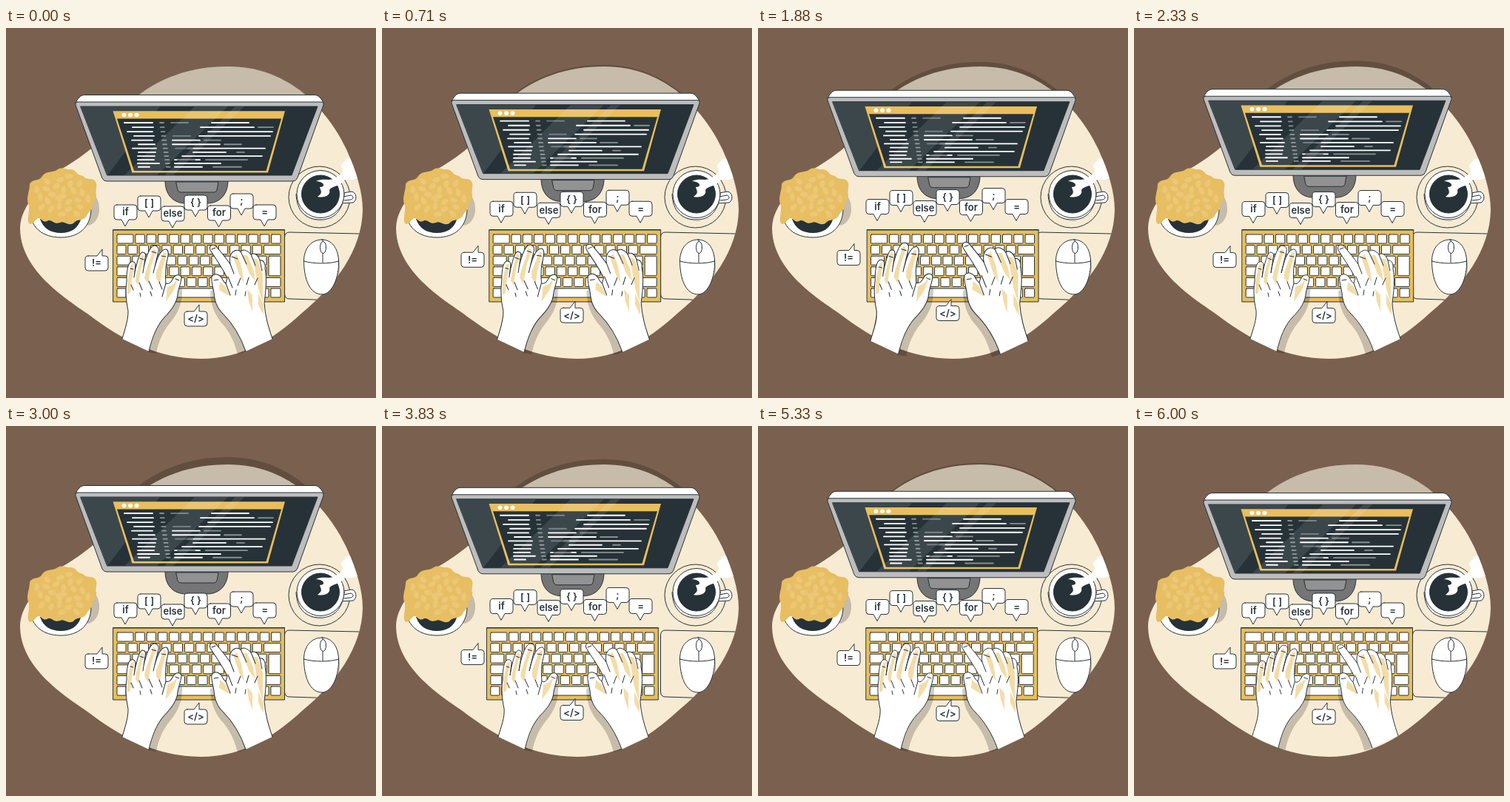
Animation of 500 by 500 pixels, one loop 6.04 s. Source, as an HTML page:

```html
<!DOCTYPE html>
<html lang="en">
<head>
<meta charset="utf-8">
<title>Typing code</title>
<style>
html, body { margin: 0; width: 100%; height: 100%; overflow: hidden; background: #7a614f; }
svg { display: block; width: 100vw; height: 100vh; }
.ink { stroke: #263238; stroke-width: 1; stroke-linejoin: round; stroke-linecap: round; }
.line { fill: none; }
.white { fill: #fff; }
.gold { fill: #e9be5c; }
.dark { fill: #263238; }
.cream { fill: #f7ebd3; }
.shade { fill: #000; opacity: .2; }
.skin { fill: #f3dca6; }
text { font: 600 13px Inter, "Open Sans", sans-serif; fill: #263238; text-anchor: middle; }
</style>
</head>
<body>
<svg viewBox="0 0 500 500">
  <defs>
    <path id="blob" d="M300 52C342 52 372 66 397 84C425 106 447 136 460 164C474 195 482 222 482 246C481 300 445 348 400 385C362 420 320 447 263 447C205 446 160 424 110 386C75 362 19 325 19 270C20 240 48 212 76 190C108 171 140 148 168 100C205 67 250 52 300 52Z"/>
    <clipPath id="inBlob"><use href="#blob"/></clipPath>
    <clipPath id="aboveDesk"><path d="M165 40H424V105H140V100Z"/></clipPath>
    <clipPath id="inScreen"><path d="M101 106H421L386 199H137Z"/></clipPath>
  </defs>

  <use href="#blob" class="cream"/>

  <!-- plant -->
  <path class="shade" d="M100 204C118 200 126 212 120 226C130 238 128 262 112 267L96 262Z"/>
  <path class="white ink" d="M33 250C34 270 50 283 74 283C98 283 114 270 115 246Z"/>
  <path class="dark" d="M46 258C50 271 61 277 74 277C88 277 98 271 102 256Z"/>
  <g id="plant"></g>

  <!-- mouse pad and mouse -->
  <g clip-path="url(#inBlob)">
    <path class="ink line" d="M500 278.500L383 276Q376.500 276 376.500 283V359Q376.500 366 383 366L430 367.500"/>
    <path class="shade" d="M434 288C454 298 456 335 442 357L428 360Z"/>
  </g>
  <path class="white ink" d="M427 286C440 286 448.500 297 449.500 314C450.500 336 441 360 427 360C410 360 402.500 338 402.500 314C403 297 413 286 427 286Z"/>
  <path class="ink line" d="M402.500 315C415 319 438 319 449.500 315M428 286V290M428 304V317"/>
  <ellipse class="white ink" cx="428.500" cy="296.500" rx="4" ry="8"/>

  <!-- cup -->
  <circle class="cream ink" cx="423.500" cy="228.500" r="41.500"/>
  <path class="shade" d="M392 235A34 34 0 0 0 450 250L440 258A36 34 0 0 1 392 235Z"/>
  <path class="white ink" d="M450 224L467 221C474 222 475 233 469 236L452 237Z"/>
  <path class="ink line" d="M456 228L466 226C470 227 470 231 466 232L457 233"/>
  <path class="white ink" d="M392 225C393 247 405 259 425 259C444 259 455 246 457 225Z"/>
  <circle class="white ink" cx="425" cy="224.500" r="32"/>
  <circle class="dark ink" cx="425" cy="224.500" r="25.500"/>
  <path class="white" clip-path="url(#inBlob)" d="M419 207C429 202 438 208 446 202C452 197 459 195 453 188C452 182 459 182 459 177C468 174 482 180 490 180V203C475 200 470 207 458 205C450 215 441 213 437 219C439 226 431 230 421 228C429 222 425 220 424 215C432 215 431 208 419 207Z"/>

  <g id="monitor">
    <g clip-path="url(#aboveDesk)"><use href="#blob" class="shade"/></g>
    <path class="ink" fill="#757575" d="M215 206C215 226 226 237 244 237H271C289 237 300 225 300 206Z"/>
    <path class="ink" fill="#929292" d="M230 208H287L285 219Q284 222 281 222H236Q233 222 232 219Z"/>
    <path class="white ink" d="M94 101C97 96 100 90.500 106 90.500H417C423 90.500 426 96 429 101Z"/>
    <path class="ink" fill="#bdbdbd" d="M96 100H427Q430 101 429 104L394 202Q392 207 388 207H136Q132 207 130 203L94 104Q93 101 96 100Z"/>
    <path class="dark ink" d="M101 106H421L386 199H137Z"/>
    <path clip-path="url(#inScreen)" class="white" opacity=".1" d="M101 106H208L137 199Z"/>
    <path class="gold" d="M144.500 112.300H377L354 195.500H170.500Z"/>
    <path class="dark" d="M150 122.500H372L351.500 193H173Z"/>
    <g class="white"><ellipse cx="159.500" cy="117.500" rx="3" ry="2.800"/><ellipse cx="168" cy="117.500" rx="3" ry="2.800"/><ellipse cx="176.500" cy="117.500" rx="3" ry="2.800"/></g>
    <g id="code" stroke-width="1.800" stroke-linecap="round"></g>
    <path clip-path="url(#inScreen)" class="white" opacity=".1" d="M255 106H300L204 199H160ZM310 106H322L226 199H214Z"/>
  </g>

  <g id="keyboard"></g>
  <g id="bubbles"></g>

  <g id="hands">
    <path class="shade" d="M230 352L238 352C239 372 232 386 222 398C212 410 206 424 203 440L192 438L206 400Z"/>
    <path class="shade" d="M281 352L276 356C277 374 281 385 290 397C302 410 308 422 313 441L325 437L305 396Z"/>
    <path class="white ink" d="M157 420C161 406 166 394 165 382C162 368 161 356 163 342C163 328 165 318 169 316C173 315 175 317 175 321L173 337C175 322 180 304 184 303C189 303 189 307 188 311L185 331C187 315 194 293 201 294C207 295 207 300 205 306L199 331C203 314 208 298 217 299C221 302 219 308 218 313C215 324 215 333 216 345C220 347 223 344 226 338C229 333 235 332 237 337C237 344 233 351 232 360C231 371 224 381 214 391C204 402 198 416 193 437"/>
    <path class="skin" d="M164 342L169 320L173 319L170 340L168 358L164 360ZM176 334L183 306L187 308L182 326L179 348L175 342ZM188 332L199 298L203 301L196 322L192 346L187 338ZM203 330L213 303L217 304L211 328L208 346L203 338ZM218 350L226 346L232 339L227 354L216 370Z"/>
    <path class="ink line" d="M168 325L172 326M181 311L186 313M197 302L203 304M210 308L216 309M169 347L172 354M180 344L184 354M193 342L198 353M207 343L211 353M216 345L211 363M229 339L234 341M181 358L182 363M195 356L197 362"/>
    <path class="white ink" d="M324 437C316 414 304 397 293 386C284 377 282 368 281 358C280 350 277 344 278 336C281 331 287 332 291 337C293 341 295 344 297 345L299 338C293 325 282 310 276 300C274 294 278 292 283 294C290 302 298 312 303 319C301 310 304 303 309 301C312 299 315 301 317 302C321 298 327 301 331 306C336 303 341 307 343 314C348 313 351 319 350 325C353 340 351 357 349 371C350 390 355 405 360 420"/>
    <path class="skin" d="M307 309L312 306L318 322L322 345L315 333ZM319 307L326 307L334 326L337 342L329 332ZM334 311L340 313L347 333L347 371L341 352ZM289 343L297 350L303 363L288 354ZM326 353L333 361L333 384L328 369ZM341 359L348 374L348 388L341 374Z"/>
    <path class="ink line" d="M303 319L308 332M305 309L313 312M317 302L325 319M331 306L337 321M343 314L346 328M278 299L283 297M300 336L306 351M317 338L313 348M328 337L325 347M340 338L336 347M281 341L287 340M297 345L303 361M311 354L310 361M324 356L323 362"/>
  </g>
</svg>
<script>
const LOOP = 6040, END = 6000;
const byId = id => document.getElementById(id);

function add(parent, tag, attrs, label) {
  const node = document.createElementNS('http://www.w3.org/2000/svg', tag);
  for (const name in attrs) node.setAttribute(name, attrs[name]);
  if (label) node.textContent = label;
  parent.append(node);
  return node;
}

function buildPlant() {
  const plant = byId('plant');
  add(plant, 'path', { fill: '#e7be62', d: 'M32 265C27 260 32 250 31 240C26 230 32 222 32 211C36 203 45 208 49 200C55 192 64 196 70 191C77 187 82 192 86 191C94 190 95 198 101 199C107 200 107 206 114 204C122 204 125 213 120 220C125 228 120 233 117 238C118 246 111 248 109 254C104 262 96 257 91 264C83 268 79 260 73 263C65 266 63 259 57 260C50 265 48 256 43 257C39 260 37 265 32 265Z' });
  for (let i = 0; i < 26; i++) {
    const a = i * 2.4, r = Math.sqrt(i / 26);
    const x = 77 + 38 * r * Math.cos(a), y = 227 + 29 * r * Math.sin(a);
    add(plant, 'ellipse', { cx: x, cy: y, rx: 5.5, ry: 3.5, fill: '#ecca7d', opacity: .75,
      transform: `rotate(${i * 47 % 180} ${x} ${y})` });
  }
}

function buildCode() {
  const rows = [
    [160, 198, 278, 328], [171, 199, 263, 335, 341, 361], [164, 198, 273, 360],
    [173, 200, 261, 357], [170, 198, 225, 262, 268, 290], [179, 201, 225, 289, 295, 318],
    [171, 203, 246, 350], [179, 202, 253, 297, 312, 322], [178, 201, 238, 346],
    [178, 200, 228, 262, 270, 326], [178, 207, 228, 290], [179, 194, 228, 265, 280, 318]];
  const code = byId('code');
  rows.forEach((row, i) => {
    const y = 128 + 6.2 * i - .07 * i * i;
    const dash = (x1, x2, stroke) => add(code, 'line', { x1, x2, y1: y, y2: y, stroke });
    for (let k = 0; k < row.length; k += 2) dash(row[k], row[k + 1], k > 2 ? '#87908f' : '#fff');
    dash(208 + i * .8, 213 + i * .8, '#87908f');
    if (i % 3 === 0) dash(223 + i, 246 + i, '#6c777b');
  });
}

function buildKeyboard() {
  const PITCH = 15.3, GAP = 2.9;
  const board = byId('keyboard');
  add(board, 'rect', { class: 'gold ink', x: 145, y: 272.5, width: 231.5, height: 97.5 });
  add(board, 'line', { class: 'ink', x1: 145, x2: 376.5, y1: 273, y2: 273, 'stroke-width': 2 });
  const key = (x, y, width, height = 12) =>
    add(board, 'rect', { class: 'white ink', x, y, width, height, rx: 1 });
  const firstWidths = [22, 12, 18, 22, 15, 12];
  const rightEdges = [371, 371, 352, 352, 371, 371];
  firstWidths.forEach((first, row) => {
    const y = 279 + row * 14.6, end = rightEdges[row];
    key(150, y, first);
    let x = 150 + first + GAP;
    while (x < end - 5) {
      const isSpace = row === 5 && x > 205 && x < 220;
      let width = isSpace ? 83 : PITCH - GAP;
      if (end - x - width < 11) width = end - x;
      key(x, y, width);
      x += width + GAP;
    }
  });
  key(355, 308.2, 16, 26.6);
}

function buildBubbles() {
  const bubbles = byId('bubbles');
  const bubble = (label, x, y, tailX) => {
    const r = x + 31, b = y + 20;
    const up = tailX ? `H${tailX - 7}L${tailX} ${y - 9}V${y}` : '';
    const down = tailX ? '' : `H${x + 20}L${x + 15} ${b + 9}L${x + 10} ${b}`;
    add(bubbles, 'path', { class: 'white ink', d:
      `M${x + 4} ${y}${up}H${r - 4}Q${r} ${y} ${r} ${y + 4}V${b - 4}Q${r} ${b} ${r - 4} ${b}` +
      `${down}H${x + 4}Q${x} ${b} ${x} ${b - 4}V${y + 4}Q${x} ${y} ${x + 4} ${y}Z` });
    add(bubbles, 'text', { x: x + 15.5, y: y + 14.5 }, label);
  };
  bubble('if', 146, 239);
  bubble('[ ]', 178, 227);
  bubble('else', 210, 241);
  bubble('{ }', 241, 226);
  bubble('for', 272.5, 240);
  bubble(';', 303, 224);
  bubble('=', 334, 239);
  bubble('!=', 107, 308, 130);
  bubble('</>', 241, 383, 261);
}

const linear = x => x;
const smooth = x => x * x * (3 - 2 * x);

function tween(keys, p, timing) {
  const i = Math.max(1, keys.findIndex(key => key[0] >= p));
  const [p0, v0] = keys[i - 1], [p1, v1] = keys[i];
  return v0 + (v1 - v0) * timing((p - p0) / (p1 - p0));
}

const SHAKE = [0, -1, 2, -4, 4, -4, 4, -4, 2, -1, 0].map((v, i) => [i / 10, v]);
const BEAT = [[0, 1], [.2, 1.06], [.55, 1], [.78, .97], [1, .97]];
const float = p => -10 * (1 - Math.abs(1 - 2 * p));

function draw(t) {
  const phase = period => t >= END ? 1 : t % period / period;
  const move = (id, x, y) => byId(id).setAttribute('transform', `translate(${x} ${y})`);
  move('monitor', 0, float(phase(6000)));
  move('bubbles', 0, float(phase(3000)));
  move('keyboard', tween(SHAKE, phase(3000), smooth), 0);
  const scale = tween(BEAT, phase(1500), linear);
  byId('hands').setAttribute('transform', `translate(258 366) scale(${scale}) translate(-258 -366)`);
}

buildPlant();
buildCode();
buildKeyboard();
buildBubbles();

const start = performance.now();
function tick() {
  draw(Math.min((performance.now() - start) % LOOP, END));
  requestAnimationFrame(tick);
}
draw(0);
requestAnimationFrame(tick);
</script>
</body>
</html>
```
